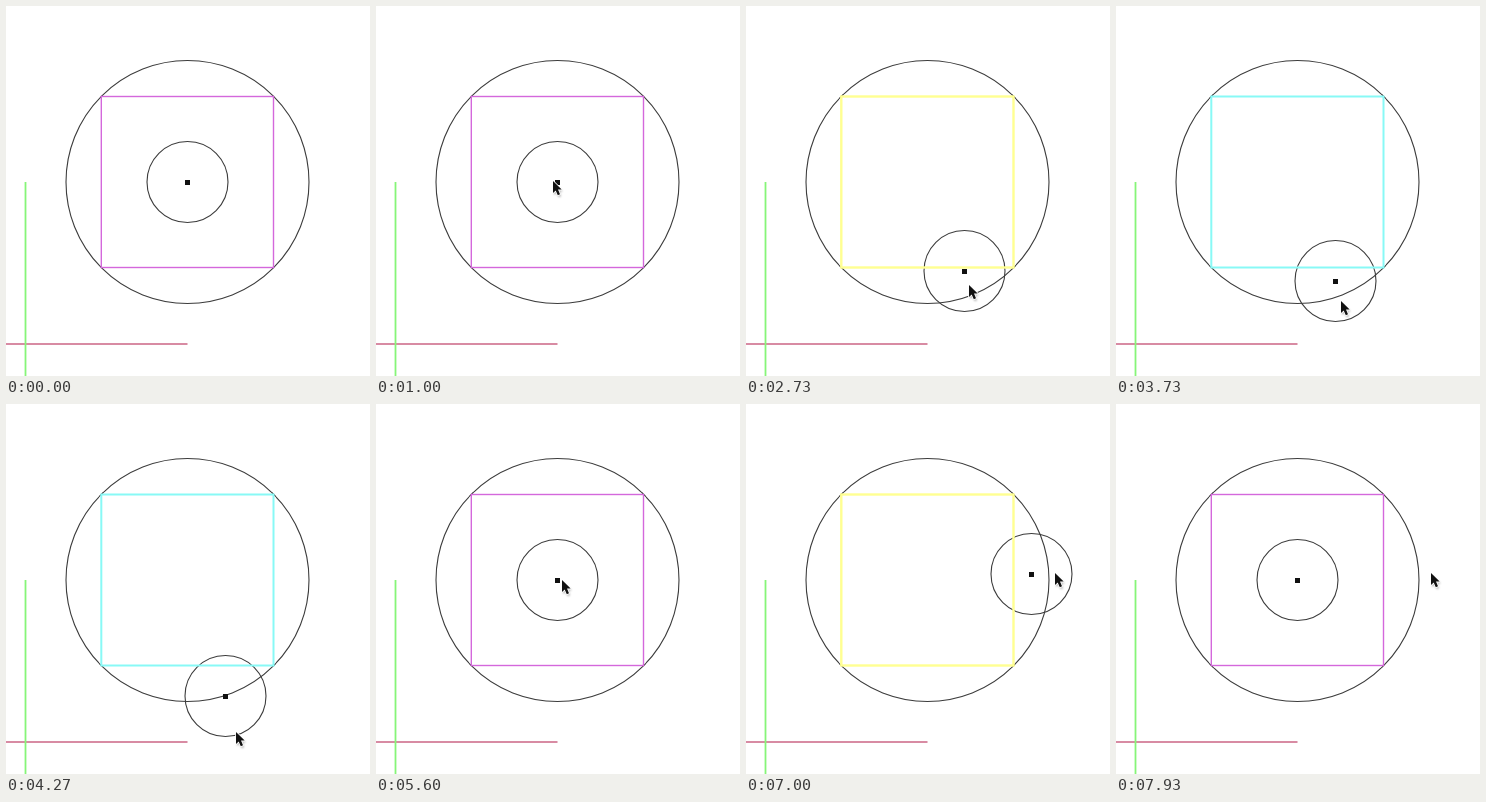
Recreate the animation shown at these times as an HTML page. Size 364 px wide and 370 px high, loop 8 s.

```html
<!DOCTYPE html>
<html lang="en">
<head>
<meta charset="utf-8">
<title>Circle drag</title>
<style>
  html, body { margin: 0; width: 100%; height: 100%; overflow: hidden; background: #fff; }
  svg { display: block; width: 364px; height: 370px; }
  .line { fill: none; stroke: #3c3c3c; stroke-width: 1.1; }
</style>
</head>
<body>
<svg viewBox="0 0 364 370">
  <defs>
    <filter id="soft" x="-60%" y="-60%" width="220%" height="220%">
      <feGaussianBlur stdDeviation="1.1"/>
    </filter>
    <path id="arrow" d="M0 0V12L2.7 9.5L4.8 14.2L7 13.2L5 8.6H8.7Z"/>
  </defs>
  <path d="M0 338H181.5" stroke="#cb6485" stroke-width="1.7"/>
  <path d="M19.5 176V370" stroke="#86f578" stroke-width="1.8"/>
  <circle class="line" cx="181.5" cy="176" r="121.5"/>
  <g id="disc">
    <circle class="line" cx="181.5" cy="176" r="40.5"/>
    <rect x="179" y="174" width="5" height="5" fill="#111"/>
  </g>
  <rect id="square" x="95.3" y="90.5" width="172.2" height="171" fill="none"/>
  <g id="cursor">
    <use href="#arrow" x="1" y="2" opacity=".35" filter="url(#soft)"/>
    <use href="#arrow" fill="#111" stroke="#fff" stroke-width="1.6" paint-order="stroke" stroke-linejoin="round"/>
  </g>
</svg>
<script>
const TICK = 1000 / 15, TICKS = 120;
const RING = 121.5, DISC = 40.5, STRETCH = 163, HOLD = 12;
const byId = id => document.getElementById(id);
const disc = byId("disc"), square = byId("square"), cursor = byId("cursor");

const move = (from, to, x, y, power = 1) => ({ from, to, x, y, power });
const entry = { x: 362, y: 195 };
const moves = [
  move(0, 10, 174, 173),
  move(12, 18, 180, 177),
  move(21, 28, 199, 204),
  move(28, 34, 215, 233),
  move(34, 41, 223, 279, 5),
  move(52, 64, 230, 328),
  move(77, 84, 186, 176),
  move(90, 95, 272, 171),
  move(96, 99, 293, 170),
  move(104, 112, 348, 168, 2.6),
  move(115, 119, 315, 169)
];

function pointer(k) {
  let { x, y } = entry;
  for (const m of moves) {
    const u = Math.min(1, Math.max(0, (k - m.from) / (m.to - m.from)));
    const e = 1 - (1 - u) ** m.power;
    x += (m.x - x) * e;
    y += (m.y - y) * e;
  }
  return { x, y };
}

// The disc follows the pointer like a rubber band
function pull(drag, k) {
  const grip = pointer(drag.from), p = pointer(k);
  const dx = p.x - grip.x, dy = p.y - grip.y;
  const far = Math.hypot(dx, dy) || 1;
  const reach = STRETCH * Math.tanh(far / STRETCH);
  return { x: dx * reach / far, y: dy * reach / far, reach };
}

const drags = [{ from: 21, to: 73 }, { from: 90, to: 116 }];
for (const d of drags) {
  d.cross = d.from;
  while (pull(d, d.cross).reach + DISC <= RING) d.cross++;
}

const inside = ["#d468dc", 1.4], crossed = ["#ffff92", 2.4], held = ["#88f9f6", 2];

function place(el, { x, y }) {
  el.setAttribute("transform", `translate(${Math.round(x)} ${Math.round(y)})`);
}

function draw(ms) {
  const k = Math.floor((ms + 4) / TICK) % TICKS;
  const drag = drags.find(d => k >= d.from && k < d.to);
  let style = inside;
  if (drag && k >= drag.cross) style = k < drag.cross + HOLD ? crossed : held;
  place(disc, drag ? pull(drag, k) : { x: 0, y: 0 });
  place(cursor, pointer(k));
  cursor.setAttribute("visibility", k ? "visible" : "hidden");
  square.setAttribute("stroke", style[0]);
  square.setAttribute("stroke-width", style[1]);
}

const start = performance.now();
function loop() {
  draw(performance.now() - start);
  requestAnimationFrame(loop);
}
loop();
</script>
</body>
</html>
```
